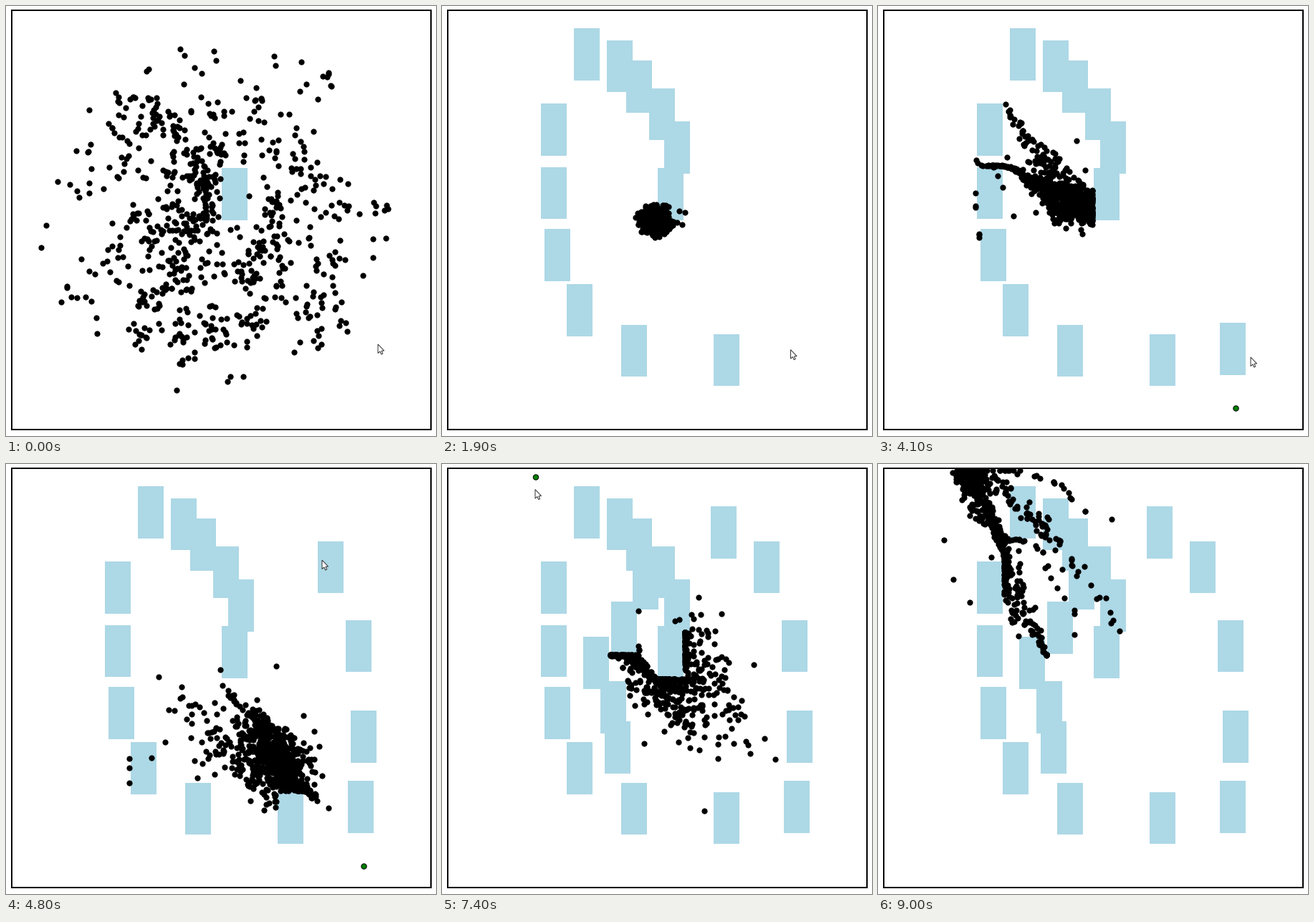
These frames come from a looping animation (600x600 px, 9.1 s). A matplotlib script:

```python
import numpy as np
import matplotlib.pyplot as plt
from matplotlib.animation import FuncAnimation
from matplotlib.patches import Circle, Polygon, Rectangle

SIZE, DPI, STEP, FRAMES = 600, 100, 100, 91
PX = 72 / DPI
DOTS = 740
DT, SUBSTEPS = 0.02, 5
CENTER = np.array([298, 300])
W, H = 36, 72.5

# Obstacle corners in the order they are clicked, in four quick runs
BLOCKS = np.array([
    (301, 226), (310, 161), (289, 114.5), (257, 76), (230, 47.5),
    (184, 31), (138, 136), (138, 224.5), (143, 311), (174, 388),
    (250, 444.5), (379, 457.5), (477, 442),
    (481, 344), (474, 217.5), (435, 107.5), (375, 59),
    (266, 130), (236, 192), (197, 241), (221, 303), (227, 359)])
PLACED = np.concatenate([[0], 450 + 165 * np.arange(4),
                         1105 + 115 * np.arange(8),
                         4360 + 200 * np.arange(4),
                         5100 + 120 * np.arange(5)])

# Goal clicks and pointer rests: time in ms, x, y
GOALS = [(2350, 57.5, 95.5), (3330, 499.5, 561.5), (6010, 131, 18.5)]
RESTS = [(0, 519, 472), (200, 575, 400), (2000, 487, 466), (2600, 57, 95),
         (3000, 485, 462), (3200, 501, 545), (4000, 499, 560),
         (4100, 520, 490), (6100, 130, 35), (8400, 130, 36), (9000, 474, 606)]
CLICKS = [(t, x + W / 2, y + H / 2)
          for t, (x, y) in zip(PLACED[1:], BLOCKS[1:])]
PATH = np.array(sorted(CLICKS + GOALS + RESTS))
ARROW = np.array([(0, 0), (0, 12.5), (2.9, 9.9), (4.7, 14), (6.7, 13.1),
                  (5, 9.2), (8.6, 9)])


def goal_at(t):
    """Last goal clicked before t, or None."""
    return next((g[1:] for g in reversed(GOALS) if g[0] <= t), None)


def inside(p, t, margin=1.5):
    """Which dots lie in an obstacle standing at time t."""
    rel = p[:, None] - BLOCKS[PLACED <= t]
    return ((rel > -margin) & (rel < np.array([W, H]) + margin)).all(2).any(1)


def scatter(rng):
    """Clumpy disc around the centre, thinner towards the rim."""
    r, a = 278 * rng.beta(2, 2.4, 300), rng.uniform(0, 2 * np.pi, 300)
    seeds = CENTER + np.c_[r * np.cos(a), r * np.sin(a)]
    p = seeds[rng.integers(300, size=DOTS)] + rng.normal(0, 9, (DOTS, 2))
    hit = inside(p, 0)
    p[hit, 0] -= W + 3
    return p


def simulate():
    """Dots chase the goal, slide along walls and slip through when held long."""
    rng = np.random.default_rng(7)
    p, v, held = scatter(rng), np.zeros((DOTS, 2)), np.zeros(DOTS)
    offset = rng.normal(0, 8.5, (DOTS, 2))
    speed = rng.normal(290, 38, DOTS)
    bias = rng.normal(0, 0.17, DOTS)
    patience = rng.lognormal(np.log(0.5), 0.5, DOTS)
    cos, sin = np.cos(bias), np.sin(bias)
    track = []
    for n in range(FRAMES):
        track.append(p.copy())
        for k in range(SUBSTEPS):
            t = n * STEP + k * DT * 1000
            goal = goal_at(t)
            dx, dy = ((CENTER if goal is None else goal) + offset - p).T
            pace = np.minimum(speed / (np.hypot(dx, dy) + 1e-6), 5)
            aim = np.c_[dx * cos - dy * sin, dx * sin + dy * cos]
            v += (aim * pace[:, None] - v) * DT / 0.12
            v += rng.normal(0, 60 * DT ** 0.5, v.shape)
            within = inside(p, t)
            free = within | (held > patience)
            bumped = np.zeros(DOTS, bool)
            for axis in (0, 1):
                q = p.copy()
                q[:, axis] += v[:, axis] * DT
                stop = inside(q, t) & ~free
                v[stop, axis] = 0
                p[~stop] = q[~stop]
                bumped |= stop
            held = np.where(bumped | within, held + DT, held * 0.9)
            p = np.clip(p, (11, 9), (590, 588))
    return track


track = simulate()

fig = plt.figure(figsize=(SIZE / DPI, SIZE / DPI), dpi=DPI, facecolor="white")
ax = fig.add_axes([0, 0, 1, 1])
ax.set(xlim=(0, SIZE), ylim=(SIZE, 0))
ax.axis("off")

blocks = [ax.add_patch(Rectangle(xy, W, H, fc="lightblue", lw=0, zorder=1))
          for xy in BLOCKS]
goal_dot = ax.add_patch(Circle((0, 0), 3.7, fc="green", ec="black", lw=PX,
                               zorder=2))
dots, = ax.plot([], [], "o", color="black", ms=8.2 * PX, mew=0, zorder=3)
ax.add_patch(Rectangle((8, 6), 585, 585, fill=False, ec="black", lw=2 * PX,
                       joinstyle="miter", zorder=4))
arrow = ax.add_patch(Polygon(ARROW, fc="white", ec="#333333", lw=PX, zorder=5))


def draw(n):
    t = n * STEP
    for block, start in zip(blocks, PLACED):
        block.set_visible(t >= start)
    goal = goal_at(t)
    goal_dot.set_visible(goal is not None)
    if goal is not None:
        goal_dot.center = goal
    dots.set_data(*track[n].T)
    tip = [np.interp(t, PATH[:, 0], PATH[:, c]) for c in (1, 2)]
    arrow.set_xy(ARROW + tip)
    return [*blocks, goal_dot, dots, arrow]


anim = FuncAnimation(fig, draw, frames=FRAMES, interval=STEP, repeat=True,
                     cache_frame_data=False)
plt.show()
```
